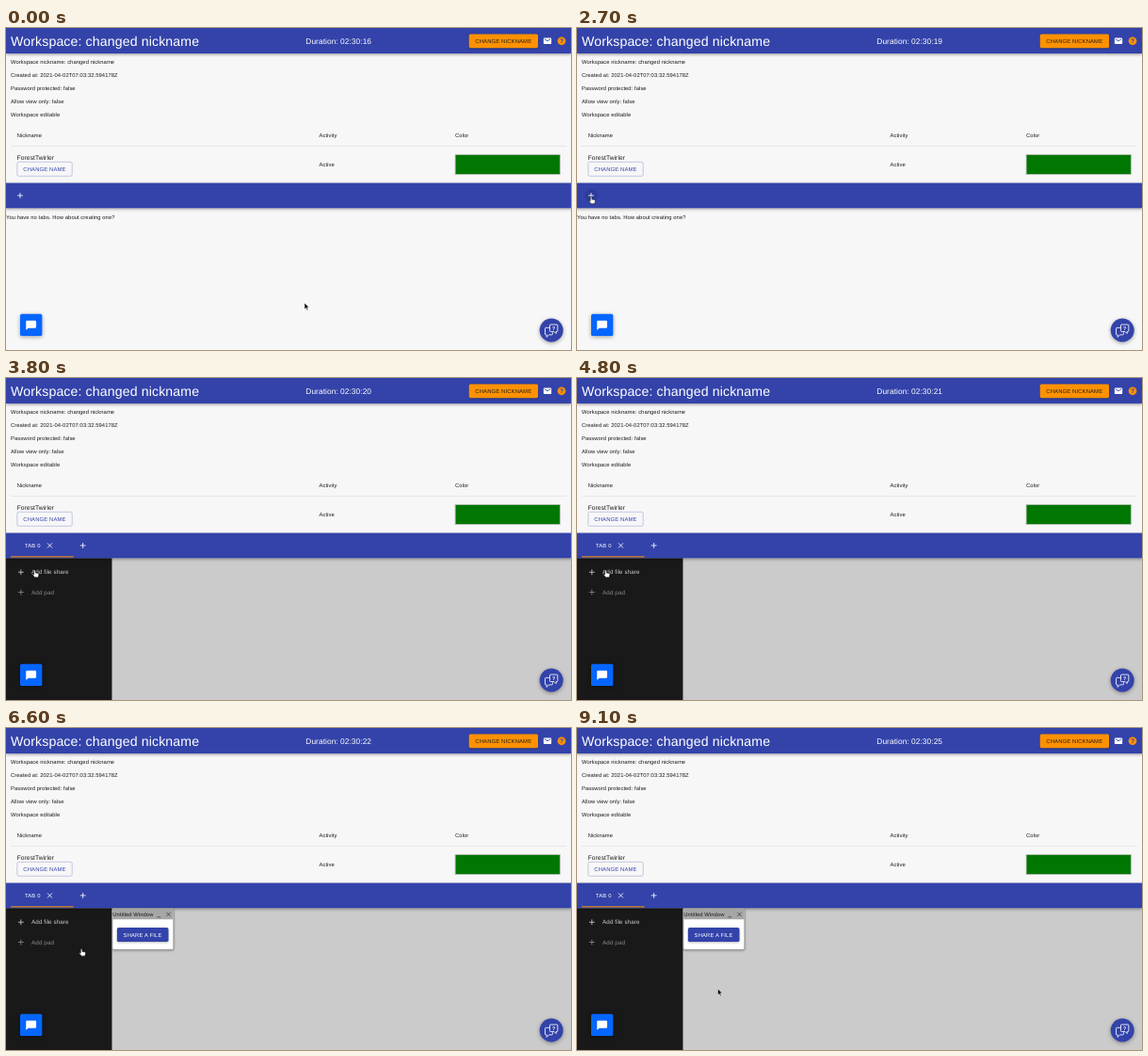
Animation, 600 px wide and 342 px high, one loop 9.2 s. Source, as an HTML page:

```html
<!DOCTYPE html>
<html lang="en">
<head>
<meta charset="utf-8">
<title>Workspace</title>
<style>
  html, body { margin: 0; width: 100%; height: 100%; overflow: hidden; background: #f7f7f7; }
  svg { display: block; width: 600px; height: 342px; }
  text {
    font: 14px "Liberation Sans", Arial, sans-serif;
    letter-spacing: .0107em;
    fill: #1c1c1c;
    text-rendering: geometricPrecision;
    white-space: pre;
  }
  .h4 { font-size: 34px; letter-spacing: .00735em; fill: #fff; }
  .h6 { font-size: 20px; letter-spacing: .0075em; fill: #fff; }
  .name { font-size: 16px; letter-spacing: .0094em; }
  .btn { letter-spacing: .02857em; }
  .item { font-size: 15px; letter-spacing: .015em; fill: inherit; }
  .light { fill: #fff; }
  .blue { fill: #3343aa; }
  .orange { fill: #ff9100; }
  .bar { filter: drop-shadow(0 3px 4px rgba(0, 0, 0, .35)); }
  .raised { filter: drop-shadow(0 2px 2px rgba(0, 0, 0, .3)); }
  .float { filter: drop-shadow(0 3px 5px rgba(0, 0, 0, .35)); }
  .line { fill: none; stroke: #fff; stroke-width: 2; }
  .row { fill: #8a8a8a; stroke: none; }
  .row path { stroke: #a0a0a0; stroke-width: 2; }
</style>
</head>
<body>
<svg viewBox="0 0 1440 820.8">
  <defs>
    <path id="plus" d="M-7 0H7M0-7V7"/>
    <path id="cross" d="M-6-6L6 6M6-6L-6 6"/>
  </defs>
  <rect width="1440" height="821" fill="#f7f7f7"/>

  <g id="details">
    <text x="12" y="90">Workspace nickname: changed nickname</text>
    <text x="12" y="124">Created at: 2021-04-02T07:03:32.594178Z</text>
    <text x="12" y="158">Password protected: false</text>
    <text x="12" y="192">Allow view only: false</text>
    <text x="12" y="226">Workspace editable</text>
    <text x="28" y="278">Nickname</text>
    <text x="798" y="278">Activity</text>
    <text x="1145" y="278">Color</text>
    <rect x="12" y="300.5" width="1416" height="1.5" fill="#dedede"/>
    <text class="name" x="28" y="336">ForestTwirler</text>
    <rect x="28.5" y="341.5" width="140" height="36" rx="4" fill="none" stroke="#9ba4d6" stroke-width="1.4"/>
    <text class="btn blue" x="44" y="365">CHANGE NAME</text>
    <text x="798" y="353">Active</text>
    <rect x="1145" y="323" width="267" height="50" fill="#070" stroke="#b4bdb4" stroke-width="2"/>
  </g>

  <text id="empty" x="0" y="488">You have no tabs. How about creating one?</text>

  <g id="board">
    <rect y="459" width="1440" height="362" fill="#cbcbcb"/>
    <rect y="459" width="270" height="362" fill="#191919"/>
    <g class="row" id="share">
      <use href="#plus" x="38" y="495" id="sharePlus" stroke="#a0a0a0" stroke-width="2"/>
      <text class="item" x="65" y="500">Add file share</text>
    </g>
    <g class="row">
      <use href="#plus" x="38" y="546" stroke="#8a8a8a" stroke-width="2"/>
      <text class="item" x="65" y="551">Add pad</text>
    </g>
  </g>

  <rect class="blue bar" width="1440" height="65"/>
  <text class="h4" x="12" y="45">Workspace: changed nickname</text>
  <text class="h6" id="clock" x="764" y="40.5"></text>
  <rect class="orange raised" x="1180" y="15.5" width="176" height="35.5" rx="4"/>
  <text class="btn" x="1196" y="38.5">CHANGE NICKNAME</text>
  <path class="light" d="M1372 25h16q2 0 2 2v12q0 2-2 2h-16q-2 0-2-2v-12q0-2 2-2zm0 2v2l8 5 8-5v-2l-8 5z"/>
  <circle class="orange" cx="1416" cy="33" r="10.5"/>
  <text class="blue" x="1416" y="38.5" text-anchor="middle" style="font-size:16px;font-weight:bold">?</text>

  <rect class="blue bar" y="395" width="1440" height="64"/>
  <g id="emptyBar">
    <circle id="hover" cx="36" cy="427" r="17" fill="rgba(0,0,0,.1)"/>
    <use href="#plus" x="36" y="427" class="line"/>
  </g>
  <g id="tabBar">
    <text class="btn light" x="48" y="431.5">TAB 0</text>
    <use href="#cross" x="111.6" y="427" class="line"/>
    <circle id="ripple" cx="196" cy="427" r="13.5" fill="#fff"/>
    <use href="#plus" x="196" y="427" class="line"/>
    <rect id="marker" class="orange" x="12" y="454.5" width="160" height="2.5"/>
  </g>

  <g id="win">
    <rect class="raised" x="271" y="460" width="156" height="105" rx="4" fill="#fff" stroke="#8c8c8c" stroke-width="2"/>
    <path d="M272 488v-24q0-3 3-3h148q3 0 3 3v24z" fill="#a6a6a6"/>
    <text x="272" y="480">Untitled Window</text>
    <path d="M385 482h9M409 470l10 10M419 470l-10 10" fill="none" stroke="#222" stroke-width="1.5"/>
    <rect class="blue raised" x="283" y="509" width="131" height="36" rx="4"/>
    <text class="btn light" x="299" y="532">SHARE A FILE</text>
  </g>

  <rect class="float" x="36" y="729" width="56" height="56" rx="4" fill="#0566ff"/>
  <path class="light" d="M54 746h20q3 0 3 3v13q0 3-3 3h-17l-6 5v-21q0-3 3-3z"/>

  <circle class="blue float" cx="1390" cy="770.4" r="30"/>
  <g class="line">
    <path d="M1386 764h-10q-2 0-2 2v14q0 2 2 2h2v6l6-6h7q2 0 2-2v-4"/>
    <path d="M1388 756h16q2 0 2 2v14q0 2-2 2h-2v5l-5-5h-9q-2 0-2-2v-14q0-2 2-2z"/>
  </g>
  <text class="light" x="1396" y="770" text-anchor="middle" style="font-size:13px;font-weight:bold">?</text>

  <g id="cursor">
    <path id="arrow" d="M0 0V16L3.8 12.6 6.3 18.4 9 17.2 6.6 11.5H11.6Z" fill="#000" stroke="#fff" stroke-width="1.2"/>
    <path id="hand" d="M-2 1.5q2-3 4 0v5.5l7 1.5q2 .8 1.6 3l-1.6 7h-9l-5.5-7q-.6-2.500 2-1.500l1.500 1.500z" fill="#fff" stroke="#000" stroke-width="1.300"/>
  </g>
</svg>
<script>
const LOOP = 9200, STEP = 100;
const TAB_AT = 2800, WINDOW_AT = 5400, HOVER_AT = 3500;
const $ = id => document.getElementById(id);
const show = (id, on) => { $(id).style.display = on ? '' : 'none'; };
const clamp = v => Math.min(1, Math.max(0, v));
const ease = p => p * p * (3 - 2 * p);
const mix = (a, b, p) => a + (b - a) * p;

// Pointer stops: time, x, y in stage pixels
const path = [
  [0, 317, 292], [300, 317, 292], [1000, 188, 245], [1500, 92, 211],
  [2000, 29.5, 190.5], [2400, 15, 179], [2900, 15, 179],
  [3600, 30.5, 204], [6200, 30.5, 204], [7100, 149.5, 277], [LOOP, 149.5, 277]
];

function pointer(t) {
  const i = path.findIndex(stop => stop[0] > t);
  const [t0, x0, y0] = path[i - 1], [t1, x1, y1] = path[i];
  const lin = (t - t0) / (t1 - t0);
  const p = t < 2400 ? lin : ease(lin);
  return [mix(x0, x1, p), mix(y0, y1, p)];
}

function draw(t) {
  const tabbed = t >= TAB_AT;
  $('clock').textContent = 'Duration: 02:30:' + (16 + Math.floor((t + 300) / 1000));

  show('empty', !tabbed);
  show('emptyBar', !tabbed);
  show('board', tabbed);
  show('tabBar', tabbed);
  show('win', t >= WINDOW_AT);

  $('hover').style.opacity = clamp((t - 2200) / 200);
  $('ripple').style.opacity = .27 * (1 - clamp((t - TAB_AT) / 500));
  $('marker').setAttribute('width', mix(48, 160, ease(clamp((t - TAB_AT) / 300))));

  const lit = clamp((t - HOVER_AT) / 250);
  const grey = Math.round(mix(138, 205, lit));
  $('share').style.fill = `rgb(${grey},${grey},${grey})`;
  $('sharePlus').style.stroke = $('share').style.fill;

  const [x, y] = pointer(t);
  const hand = t >= 2300 && t < 6300 || t >= 6300 && y < 238;
  show('hand', hand);
  show('arrow', !hand);
  $('cursor').setAttribute('transform', `translate(${x * 2.4} ${y * 2.4})`);
}

const start = performance.now();
function tick() {
  const t = (performance.now() - start) % LOOP;
  draw(Math.floor(t / STEP) * STEP);
  requestAnimationFrame(tick);
}
tick();
</script>
</body>
</html>
```
